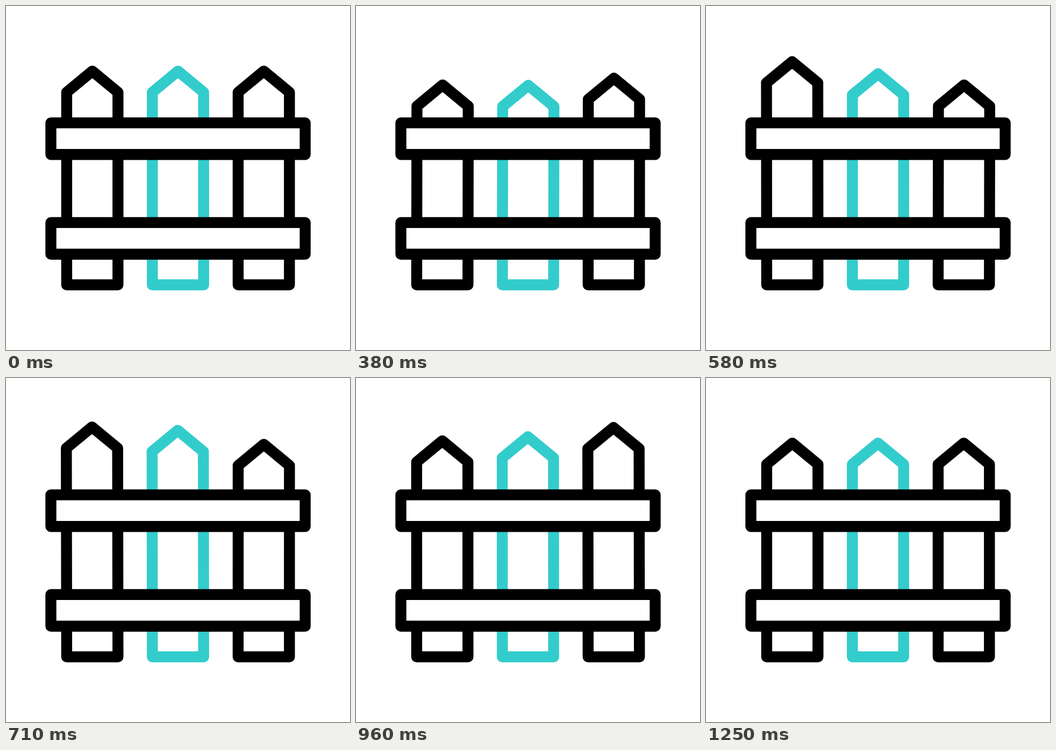
An HTML page for the animation above (1540 ms loop, 640 px wide and 640 px high).

```html
<!DOCTYPE html>
<html lang="en">
<head>
<meta charset="utf-8">
<title>Picket fence</title>
<style>
  html, body { margin: 0; width: 100%; height: 100%; overflow: hidden; background: #fff; }
  svg { display: block; width: 100%; height: 100%; }
  .line { fill: #fff; stroke: #000; stroke-width: 20.4; stroke-linejoin: round; }
  .accent { stroke: #33cccc; }
</style>
</head>
<body>
<svg viewBox="0 0 640 640">
  <path class="line picket"/>
  <path class="line picket accent"/>
  <path class="line picket"/>
  <rect class="line" x="83.5" y="217.4" width="473.1" height="58.9"/>
  <rect class="line" x="83.5" y="402.9" width="473.1" height="58.9"/>
</svg>
<script>
  const LOOP = 1540;
  const TICK = 1000 / 24;
  const HALF = 47.7;
  const LOW = 27.3, HIGH = -30;

  // Ticks: sink from/to, rise from/to, settle from/to.
  const outer = [0, 8.2, 8.2, 16.5, 17.2, 24.8];
  const inner = [2.4, 9.8, 10.5, 18.7, 19, 26];
  const pickets = [
    { x: 160.6, keys: outer },
    { x: 320, keys: inner },
    { x: 479.6, keys: outer.map(k => k + 5) }
  ];
  const paths = document.querySelectorAll('.picket');

  function ease(t, from, to) {
    const p = Math.min(1, Math.max(0, (t - from) / (to - from)));
    return p * p * (3 - 2 * p);
  }

  function offset(t, [a, b, c, d, e, f]) {
    return LOW * ease(t, a, b) + (HIGH - LOW) * ease(t, c, d) - HIGH * ease(t, e, f);
  }

  // The foot stays put; the pointed head moves and leans slightly.
  function outline(x, dy) {
    const top = x + dy * 0.02;
    const shoulder = 160.5 + dy;
    return `M${x - HALF} 518.7L${top - HALF} ${shoulder}L${top} ${121.1 + dy}` +
           `L${top + HALF} ${shoulder}L${x + HALF} 518.7Z`;
  }

  function draw(now) {
    const tick = Math.floor((now % LOOP + 5) / TICK);
    pickets.forEach(({ x, keys }, i) =>
      paths[i].setAttribute('d', outline(x, offset(tick, keys))));
    requestAnimationFrame(draw);
  }

  draw(0);
</script>
</body>
</html>
```
